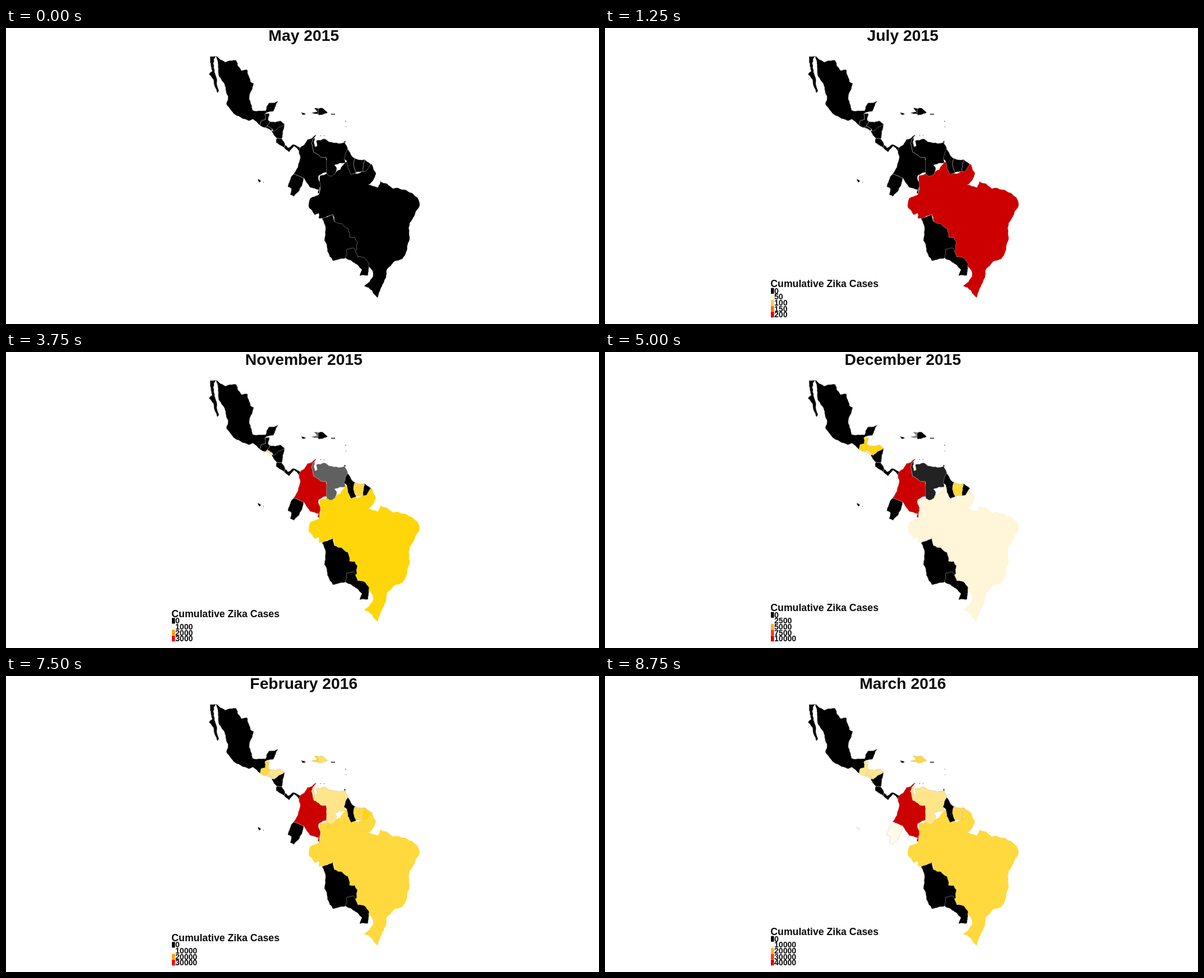
Animation of 1058 by 529 pixels, one loop 10000 ms. Source, as an HTML page with a canvas:

```html
<!DOCTYPE html>
<html lang="en">
<head>
<meta charset="utf-8">
<title>Monthly case map</title>
<style>
  html, body { margin: 0; width: 100%; height: 100%; overflow: hidden; background: #fff; }
  canvas { display: block; }
</style>
</head>
<body>
<canvas id="stage" width="1058" height="529"></canvas>
<script>
const ctx = document.getElementById('stage').getContext('2d');
const STEP = 1250;
const FONT = '"Liberation Sans", Arial, sans-serif';
const regions = [];

// Seeded by both ends, so neighbours roughen a shared border alike.
function wobble(a, b) {
  const n = Math.sin(a[0] * 12.9 + a[1] * 78.2 + b[0] * 37.7 + b[1] * 4.1) * 43758.5;
  return (n - Math.floor(n) - 0.5) * 0.2;
}

function roughen(a, b) {
  const dx = b[0] - a[0], dy = b[1] - a[1];
  if (Math.hypot(dx, dy) < 4) return [b];
  const flip = dx < 0 || (dx === 0 && dy < 0);
  const k = flip ? -wobble(b, a) : wobble(a, b);
  const mid = [(a[0] + b[0]) / 2 - dy * k, (a[1] + b[1]) / 2 + dx * k];
  return [...roughen(a, mid), ...roughen(mid, b)];
}

function region(name, corners) {
  const points = corners.split(',').map(p => p.trim().split(' ').map(Number));
  const path = new Path2D();
  points.forEach((p, i) => {
    for (const q of roughen(p, points[(i + 1) % points.length])) path.lineTo(...q);
  });
  path.closePath();
  regions.push({ name, path });
}

// Later regions cover the overlaps of earlier ones.
region('brazil', `652 243, 660 261, 648 280, 664 285, 668 274, 690 287, 712 289, 734 303, 738 317, 720 349,
  719 366, 715 398, 707 413, 693 417, 679 433, 678 446, 668 467, 663 482, 653 469, 639 461, 655 443, 654 434,
  640 420, 600 380, 583 333, 566 341, 558 340, 558 331, 551 334, 540 319, 543 304, 558 298, 560 264, 573 259,
  580 263, 609 238, 616 261, 637 256`);
region('colombia', `554 191, 538 199, 532 209, 523 215, 525 232, 521 247, 513 261, 531 268, 543 285, 558 289,
  556 295, 559 296, 561 279, 558 264, 573 258, 571 231, 562 231, 549 222, 545 206, 549 197`);
region('venezuela', `549 197, 545 206, 549 222, 562 231, 571 231, 573 262, 578 265, 587 261, 590 250, 586 245,
  605 241, 604 233, 610 218, 604 204, 584 205, 568 198, 554 201, 555 211, 551 212, 551 196`);
region('ecuador', '513 261, 531 268, 528 282, 514 301, 507 298, 509 287, 503 284, 508 268');
region('guyana', '610 217, 617 229, 623 233, 620 245, 625 258, 616 262, 608 238, 603 234');
region('suriname', '623 233, 640 235, 638 246, 637 257, 625 258, 620 245');
region('guiana', '640 235, 651 244, 643 256, 637 257, 638 246');
region('bolivia', `564 341, 583 333, 586 346, 610 358, 613 374, 622 374, 627 382, 626 396, 606 411, 583 416,
  568 380, 570 357`);
region('paraguay', '606 411, 608 395, 620 393, 628 409, 640 411, 648 422, 646 442, 631 443, 635 432');
region('mexico', `375 50, 391 61, 411 58, 420 76, 431 75, 436 96, 442 99, 434 126, 440 147, 463 148, 469 134,
  486 130, 477 149, 462 153, 463 164, 455 166, 453 174, 440 163, 433 166, 412 157, 393 136, 396 122, 379 82, 378 64`);
region('mexico', '364 51, 375 50, 371 56, 371 72, 376 99, 380 112, 377 116, 370 92, 362 83, 368 77');
region('guatemala', '453 174, 455 166, 463 164, 462 153, 470 153, 468 165, 471 167, 466 175, 463 178');
region('salvador', '463 178, 466 175, 475 180, 474 184');
region('nicaragua', '474 185, 482 178, 497 172, 492 198, 483 197');
region('honduras', '466 175, 471 167, 490 166, 497 172, 478 185, 475 180');
region('costaRica', '483 197, 492 198, 498 209, 497 215, 482 205');
region('panama', '498 209, 503 214, 512 208, 525 214, 522 220, 514 211, 505 222, 497 215');
region('haiti', '557 144, 550 143, 555 150, 545 152, 557 154');
region('dominican', '557 144, 565 143, 574 151, 558 156, 557 154');
region('jamaica', '526 151, 532 152, 535 154, 529 155');
region('puertoRico', '580 153, 587 153, 587 155, 580 155');
region('trinidad', '603 202, 606 202, 605 206');
region('galapagos', '449 270, 452 271, 455 274, 452 276');
region('antilles', '605 166, 607 166, 606 168');
region('antilles', '606 176, 607 176, 607 178');

const RED = '#cc0000', GOLD = '#ffd60a', AMBER = '#ffd93d', CORN = '#ffe06b',
  SAND = '#ffe58a', CREAM = '#fff3d0', ASH = '#606060';
const FIVE = ['black', '#fff5d8', '#ffc56e', '#ff7000', '#d80000'];
const FOUR = ['black', 'white', '#ff9c0a', '#ee0808'];
const STRONG = ['black', 'white', '#ffac34', '#f83c10', '#d40000'];

const months = [
  { title: 'May 2015', ramp: [], fills: {} },
  { title: 'July 2015', ramp: FIVE, unit: 50, fills: { brazil: RED } },
  { title: 'October 2015', ramp: FIVE, unit: 100,
    fills: { colombia: RED, brazil: CORN, haiti: CORN, suriname: 'white' } },
  { title: 'November 2015', ramp: FOUR, unit: 1000,
    fills: { colombia: RED, brazil: GOLD, suriname: AMBER, venezuela: ASH, haiti: ASH, salvador: SAND } },
  { title: 'December 2015', ramp: STRONG, unit: 2500,
    fills: { colombia: RED, brazil: '#fff5d8', suriname: AMBER, venezuela: '#222', haiti: 'gray',
      guatemala: GOLD, honduras: GOLD, salvador: SAND } },
  { title: 'January 2016', ramp: FIVE, unit: 5000,
    fills: { colombia: RED, brazil: '#c8c8c8', suriname: '#ffd84a', guiana: GOLD, venezuela: CREAM,
      haiti: GOLD, dominican: CREAM, guatemala: GOLD, honduras: CREAM, salvador: CREAM } },
  { title: 'February 2016', ramp: FOUR, unit: 10000,
    fills: { colombia: RED, brazil: AMBER, suriname: '#ffd84a', guiana: GOLD, venezuela: SAND,
      haiti: GOLD, dominican: CORN, guatemala: AMBER, honduras: SAND, salvador: SAND } },
  { title: 'March 2016', ramp: STRONG, unit: 10000,
    fills: { colombia: RED, brazil: AMBER, suriname: '#ffd84a', guiana: AMBER, venezuela: SAND,
      haiti: AMBER, dominican: AMBER, guatemala: SAND, honduras: SAND, salvador: SAND,
      ecuador: '#fffbe8', galapagos: '#fffbe8', antilles: SAND } }
];

function text(str, x, y, size, align = 'left') {
  ctx.font = `bold ${size}px ${FONT}`;
  ctx.textAlign = align;
  ctx.fillStyle = '#0a0a0a';
  ctx.fillText(str, x, y);
}

function line(color, width, ...points) {
  ctx.strokeStyle = color;
  ctx.lineWidth = width;
  ctx.beginPath();
  points.forEach(p => ctx.lineTo(...p));
  ctx.stroke();
}

function drawMap(fills) {
  ctx.lineJoin = 'round';
  for (const { name, path } of regions) {
    ctx.fillStyle = fills[name] || 'black';
    ctx.fill(path);
    if (name === 'brazil') {
      line('white', 1.2, [647, 280], [656, 278], [657, 271], [668, 271]);
      line('white', 1, [656, 278], [664, 281]);
    } else {
      ctx.strokeStyle = '#bebebe';
      ctx.lineWidth = 0.5;
      ctx.stroke(path);
    }
  }
  ctx.fillStyle = fills.curacao || 'black';
  for (const x of [561, 567]) ctx.fillRect(x, 192, 1, 1);
  ctx.fillStyle = fills.galapagos || 'black';
  ctx.fillRect(459, 275, 1, 1);
}

function drawLegend(ramp, unit) {
  if (!ramp.length) return;
  const pitch = 10.6;
  const top = 517.7 - pitch * ramp.length;
  text('Cumulative Zika Cases', 295.3, top - 1.7, 17.7);
  ramp.forEach((color, i) => {
    const y = top + pitch * i;
    ctx.fillStyle = color;
    ctx.fillRect(296, y, 5.5, pitch - 0.4);
    text(String(unit * i), 302, y + 10.1, 14.1);
  });
}

let shown = -1;
function frame() {
  const index = Math.floor(performance.now() / STEP) % months.length;
  if (index !== shown) {
    shown = index;
    const { title, ramp, unit, fills } = months[index];
    ctx.fillStyle = 'white';
    ctx.fillRect(0, 0, 1058, 529);
    drawMap(fills);
    drawLegend(ramp, unit);
    text(title, 531.3, 22.8, 28.3, 'center');
  }
  requestAnimationFrame(frame);
}
frame();
</script>
</body>
</html>
```
